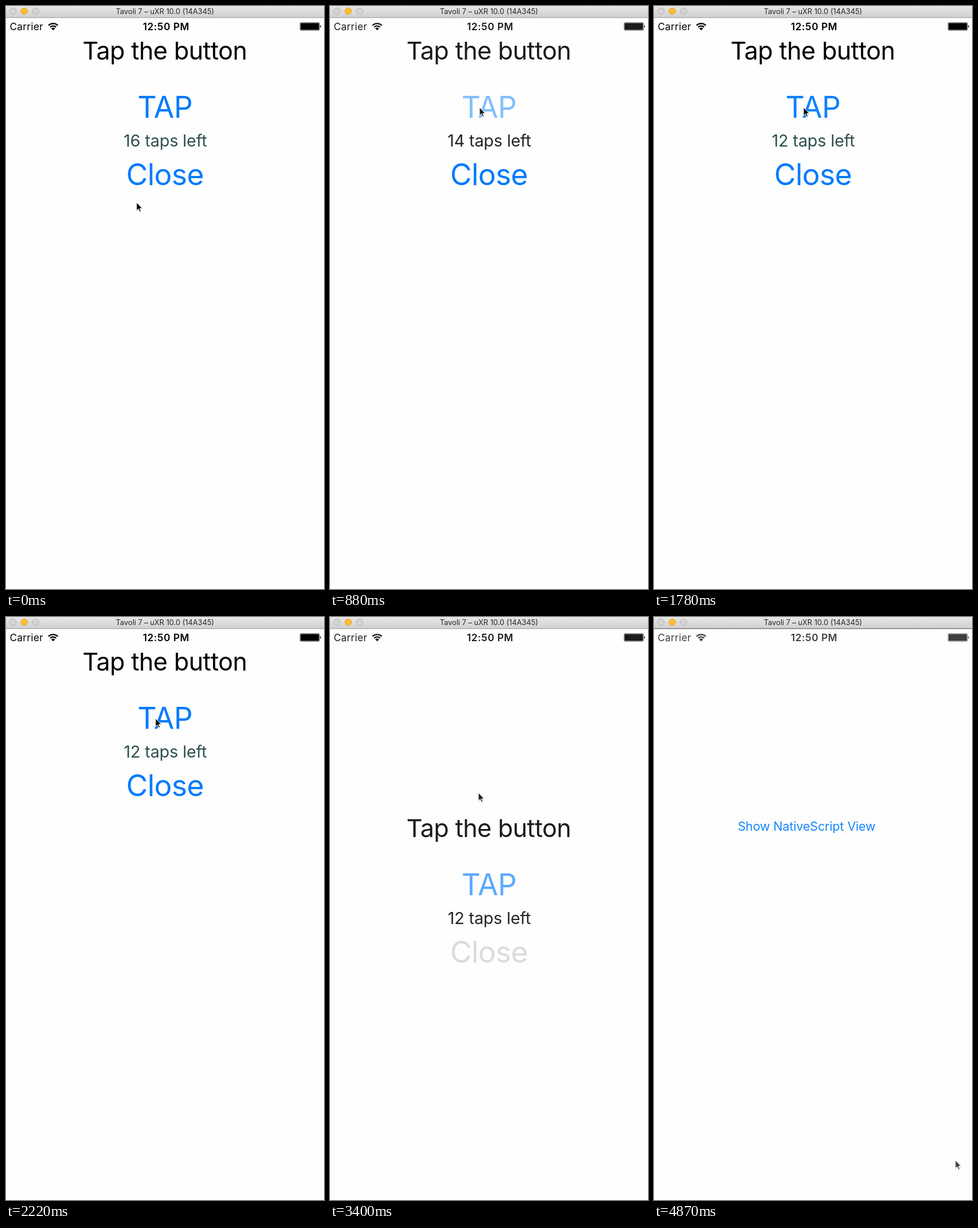
Animation, 553 px wide and 1012 px high, one loop 4970 ms. Source, as an HTML page:

```html
<!DOCTYPE html>
<html lang="en">
<head>
<meta charset="utf-8">
<title>Tap the button</title>
<style>
  html, body { margin: 0; width: 100%; height: 100%; overflow: hidden; background: #fefefe; }
  svg { display: block; width: 100%; height: 100%; --ink: #000; --soft: #2f4f4f; }
  text { font-family: Inter, Roboto, sans-serif; text-anchor: middle; fill: var(--ink); white-space: pre; }
  .left { text-anchor: start; }
  .status { font-size: 17.2px; }
  .head { font-size: 43px; letter-spacing: -.6px; }
  .big { font-size: 51.4px; letter-spacing: -.6px; fill: #007aff; }
  .count { font-size: 28.7px; letter-spacing: -.15px; fill: var(--soft); }
  .show { font-size: 21.4px; letter-spacing: -.1px; fill: #1586ff; }
  .title { font-size: 12.8px; fill: #262626; }
  .ink { fill: var(--ink); }
  .arc { fill: none; stroke: var(--ink); stroke-width: 2.3; }
</style>
</head>
<body>
<svg viewBox="0 0 553 1012" preserveAspectRatio="none">
  <defs>
    <linearGradient id="bar" x2="0" y2="1">
      <stop stop-color="#e7e6e7"/><stop offset="1" stop-color="#d1d0d1"/>
    </linearGradient>
  </defs>
  <rect width="553" height="1012" fill="#fefefe"/>
  <text class="show" x="265.5" y="371">Show NativeScript View</text>

  <g id="modal">
    <rect y="20" width="553" height="992" fill="#fefefe"/>
    <text class="head" x="276" y="92.5">Tap the button</text>
    <text class="big" id="tap" x="276.5" y="194">TAP</text>
    <text class="count" id="count" x="277" y="244">16 taps left</text>
    <text class="big" id="close" x="276.5" y="311">Close</text>
  </g>

  <g id="status">
    <text class="status left" x="6.5" y="42" letter-spacing=".3">Carrier</text>
    <text class="status" x="278.5" y="42" font-weight="600" letter-spacing=".55">12:50 PM</text>
    <path class="arc" d="M73.9 33.8A11.4 11.4 0 0 1 90.1 33.8M76.8 36.8A7.4 7.4 0 0 1 87.2 36.8"/>
    <path class="ink" d="M82 42.2L78.7 38.9A4.7 4.7 0 0 1 85.3 38.9Z"/>
    <rect x="511" y="28.5" width="34.5" height="14" rx="2.5" fill="none" stroke="var(--ink)" stroke-opacity=".6" stroke-width=".8"/>
    <rect class="ink" x="512.1" y="29.5" width="32.3" height="12" rx="1.3"/>
    <path class="ink" d="M546.3 33.2q1.5 .8 1.5 2.3t-1.5 2.3z"/>
  </g>

  <rect width="553" height="20" fill="url(#bar)"/>
  <rect id="edge" y="19.6" width="553" height="1.2" fill="#a4a4a4"/>
  <g fill="#d5d4d5" stroke="#b3b2b3">
    <circle cx="12" cy="9" r="5.7"/>
    <circle cx="31.7" cy="9" r="5.7" fill="#fdbe2f" stroke="#e0a32a"/>
    <circle cx="51.5" cy="9" r="5.7"/>
  </g>
  <text class="title" x="276.5" y="14">Tavoli 7 – uXR 10.0 (14A345)</text>

  <g id="cursor">
    <path d="M0 1.5V16L3.2 13 5.5 18 8 17 5.8 12H10.4Z" opacity=".15"/>
    <path class="ink" d="M0 0V14.2L3.2 11.2 5.5 16.2 7.8 15.2 5.6 10.4H10Z" stroke="#fff" stroke-linejoin="round"/>
  </g>
</svg>
<script>
// The picture advances in even steps; all times below are step numbers.
const LOOP = 4970, STEP = 147.7, LEAD = 8;
const PRESS_CLOSE = 21, SLIDE_FROM = 22, SLIDE_TO = 25, SLIDE_BY = 1115, CLOSED = 27;
const releases = [4, 6, 9, 11];
const moves = [
  { from: 0, to: 2, x: 260, y: 176 },
  { from: 16, to: 21, x: 258, y: 305 },
  { from: 24, to: 28, x: 560, y: 1080 },
  { from: 31, to: 33, x: 524, y: 943 },
];

const $ = id => document.getElementById(id);
const svg = document.querySelector('svg');

function ease(k, from, to) {
  const p = Math.min(1, Math.max(0, (k - from) / (to - from)));
  return p * p * (3 - 2 * p);
}

function cursorAt(k) {
  let x = 227, y = 341;
  for (const m of moves) {
    const p = ease(k, m.from, m.to);
    x += (m.x - x) * p;
    y += (m.y - y) * p;
  }
  return [x, y];
}

// Dim while pressed, then fade back after each release.
function tapAlpha(k) {
  if (k > SLIDE_FROM) return .64;
  if (releases.includes(k + 1)) return .2;
  const last = releases.filter(r => r <= k).pop() ?? -Infinity;
  return 1 - .52 * .12 ** (k - last);
}

function draw(ms) {
  const k = Math.floor((ms % LOOP + LEAD) / STEP);
  const closed = k >= CLOSED, fresh = k < 24 && k % 12 < 4;
  svg.style.setProperty('--ink', closed ? '#3f3f41' : fresh ? '#000' : '#191b1d');
  svg.style.setProperty('--soft', fresh ? '#2f4f4f' : '#222628');
  $('edge').style.fill = closed ? '#666' : '#a4a4a4';
  $('cursor').setAttribute('transform', `translate(${cursorAt(k)})`);
  $('modal').setAttribute('transform', `translate(0 ${SLIDE_BY * ease(k, SLIDE_FROM, SLIDE_TO)})`);
  $('count').textContent = `${16 - releases.filter(r => r <= k).length} taps left`;
  $('tap').style.opacity = tapAlpha(k);
  $('close').style.opacity = k < PRESS_CLOSE ? 1 : .18;
  $('close').style.fill = k > SLIDE_FROM ? '#3c4048' : '#007aff';
}

const start = performance.now();
function tick() {
  draw(performance.now() - start);
  requestAnimationFrame(tick);
}
tick();
</script>
</body>
</html>
```
